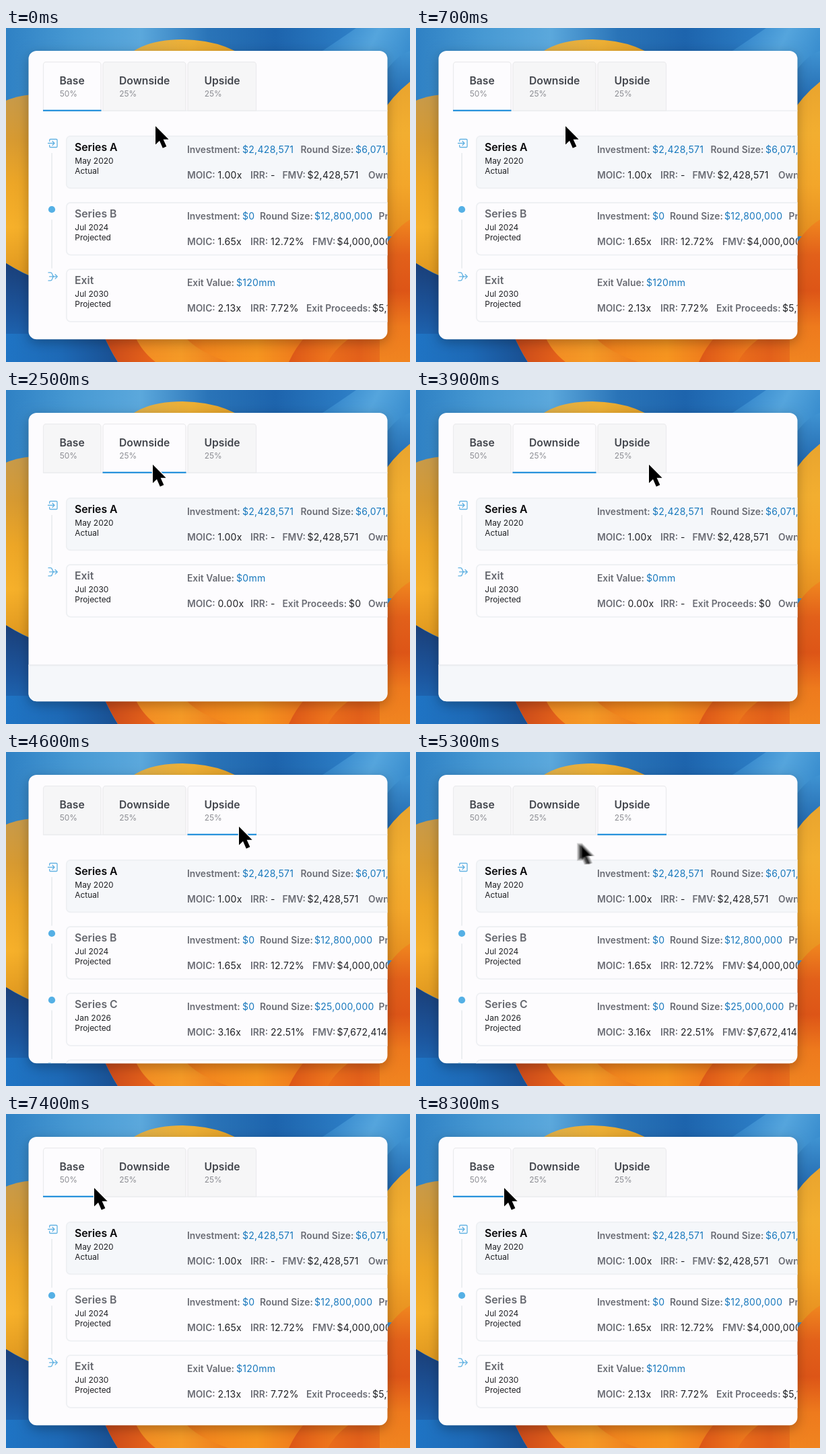
Animation, 600 px wide and 497 px high, one loop 8400 ms. Source, as an HTML page with a canvas:

```html
<!DOCTYPE html>
<html lang="en">
<head>
<meta charset="utf-8">
<title>Scenario tabs</title>
<style>
html, body { margin: 0; width: 100%; height: 100%; overflow: hidden; }
canvas { display: block; width: 600px; height: 497px; }
</style>
</head>
<body>
<canvas id="stage"></canvas>
<script>
const W = 600, H = 497, LOOP = 8400, STEP = 100, ROW = 99.2;
const FONT = 'Inter, "Liberation Sans", sans-serif';
const BLUE = '#1878bd', ICON = '#62b2e2', GREY = '#6a6c74', INK = '#1f2024', LINE = '#eceef1';

const canvas = document.getElementById('stage');
const dpr = window.devicePixelRatio || 1;
const ctx = makeLayer(canvas);
const blurCtx = makeLayer(document.createElement('canvas'));

function makeLayer(el) {
  el.width = W * dpr;
  el.height = H * dpr;
  const c = el.getContext('2d');
  c.scale(dpr, dpr);
  return c;
}

// ---- wallpaper ----
function linear(x0, y0, x1, y1, colors) {
  const g = ctx.createLinearGradient(x0, y0, x1, y1);
  colors.forEach((c, i) => g.addColorStop(i / (colors.length - 1), c));
  return g;
}

function fillPath(d, style) {
  ctx.fillStyle = style;
  ctx.fill(new Path2D(d));
}

function drawWallpaper() {
  ctx.fillStyle = linear(0, 0, W, 0, ['#2f81c4', '#4799d3', '#5ba8dc', '#2a74b8', '#1d64ad', '#2b7bc3', '#4a9ad6']);
  ctx.fillRect(0, 0, W, H);
  // light ribbon and deep blue on the right
  fillPath('M470 34 Q500 14 520 0 H600 V50 Q580 60 560 80 Z', linear(480, 0, 600, 60, ['#2f82c9', '#55a5dd', '#3388cb']));
  fillPath('M560 70 Q580 40 600 34 V130 H560 Z', linear(0, 34, 0, 110, ['#3f93d2', '#2268ae']));
  // top dome
  fillPath('M165 60 Q190 17 262 17 Q335 18 375 60 Z', linear(180, 0, 365, 0, ['#dcae4c', '#eeb035', '#dd9a25']));
  // left amber sphere
  fillPath('M0 108 Q18 100 50 98 V375 Q25 365 0 350 Z',
    linear(0, 100, 0, 362, ['#c79a4a', '#d79a31', '#eda626', '#f6b02a', '#e29a20']));
  // lower left blue
  fillPath('M0 350 Q25 366 50 375 V497 H0 Z', linear(0, 350, 0, 497, ['#1a3f78', '#1c559d', '#1f74c4']));
  fillPath('M0 455 H144 Q154 478 166 497 H0 Z', linear(0, 0, 165, 0, ['#1f74c4', '#1d69b6', '#194f91']));
  // lower petals
  fillPath('M144 455 Q154 478 166 497 H600 V455 Z',
    linear(145, 0, 600, 0, ['#c8481a', '#e8641a', '#f3861d', '#f6951f', '#ee751b', '#e3601a', '#f0801e']));
  fillPath('M190 455 Q200 480 222 497 H330 Q280 480 262 455 Z', linear(190, 0, 330, 0, ['#f28a22', '#f59a26', '#ee7c1c']));
  fillPath('M420 497 Q430 475 448 455 H520 Q490 474 478 497 Z', linear(420, 0, 520, 0, ['#dc5618', '#ec701b', '#f28520']));
  // right amber and orange
  fillPath('M555 132 Q572 102 600 80 V310 H555 Z', linear(0, 80, 0, 310, ['#e9a42e', '#f2ae30', '#f3a62a', '#e68e1f']));
  fillPath('M555 338 Q575 300 600 285 V497 H555 Z', linear(0, 285, 0, 497, ['#f0871f', '#e2601a', '#dd5517', '#ee7a1d', '#f08420']));
}

// ---- interface ----
function text(s, x, y, size, weight, color, spacing = 0) {
  ctx.font = `${weight} ${size}px ${FONT}`;
  ctx.letterSpacing = spacing + 'px';
  ctx.fillStyle = color;
  ctx.fillText(s, x, y);
}

const label = (s, x, y) => text(s, x, y, 13.8, 600, GREY);
const value = (s, x, y, color = INK) => text(s, x, y, 14, 400, color, 0.3);

function box(x, y, w, h, r, fill, stroke, lineWidth) {
  ctx.beginPath();
  ctx.roundRect(x, y, w, h, r);
  ctx.fillStyle = fill;
  ctx.fill();
  if (!stroke) return;
  ctx.strokeStyle = stroke;
  ctx.lineWidth = lineWidth;
  ctx.stroke();
}

const TABS = [
  { name: 'Base', share: '50%', x: 55, w: 86.5, tx: 79.5 },
  { name: 'Downside', share: '25%', x: 143.5, w: 124, tx: 168 },
  { name: 'Upside', share: '25%', x: 269.5, w: 102.5, tx: 294.5 }
];

function drawTabs(active) {
  ctx.fillStyle = LINE;
  ctx.fillRect(55, 122.5, 520, 1.3);
  TABS.forEach((t, i) => {
    const on = i === active;
    box(t.x + 0.5, 50.7, t.w - 1, 72.3, [4, 4, 0, 0], on ? '#fdfcfe' : '#f6f6f7', '#ebebed', 1.2);
    if (on) {
      ctx.fillStyle = '#218fdb';
      ctx.fillRect(t.x, 121.7, t.w, 2.2);
    }
    text(t.name, t.tx, 84, 15.7, 600, '#43464d');
    text(t.share, t.tx + 0.3, 102, 11.9, 400, '#8b8c92');
  });
}

function strokeIcon(d, y) {
  ctx.save();
  ctx.translate(69.5, y);
  ctx.strokeStyle = ICON;
  ctx.lineWidth = 1.3;
  ctx.lineCap = ctx.lineJoin = 'round';
  ctx.stroke(new Path2D(d));
  ctx.restore();
}

const MARKERS = {
  enter: y => strokeIcon('M-4.8 -3 V-4.8 Q-4.8 -6 -3.6 -6 H5.2 Q6.5 -6 6.5 -4.8 V4.8 Q6.5 6 5.2 6 H-3.6 Q-4.8 6 -4.8 4.8 V3 M-7 0 H2.5 M-0.5 -3 L2.5 0 L-0.5 3', y),
  exit: y => strokeIcon('M-6.5 -6 H-3.5 Q-1.5 -6 -0.8 -3.5 Q0 0 2 0 M-6.5 6 H-3.5 Q-1.5 6 -0.8 3.5 Q0 0 2 0 M-5 0 H6.7 M3.6 -3.2 L6.8 0 L3.6 3.2', y),
  dot: y => {
    ctx.fillStyle = '#55b0e5';
    ctx.beginPath();
    ctx.arc(68, y - 0.7, 5.1, 0, 7);
    ctx.fill();
  }
};

// Each cell is [x, label, offset of value, value].
const round = (name, date, size, moic, irr, fmv) => ({
  name, date, state: 'Projected', marker: 'dot',
  top: [[269, 'Investment:', 351, '$0'], [377, 'Round Size:', 458, size], [553.5, 'Pre-Money:']],
  low: [[269, 'MOIC:', 314.5, moic], [363, 'IRR:', 393, irr], [455, 'FMV:', 491.5, fmv]]
});
const exit = (worth, low) => ({
  name: 'Exit', date: 'Jul 2030', state: 'Projected', marker: 'exit',
  top: [[269, 'Exit Value:', 342, worth]], low
});

const SERIES_A = {
  name: 'Series A', date: 'May 2020', state: 'Actual', marker: 'enter', actual: true,
  top: [[269, 'Investment:', 351, '$2,428,571'], [437.5, 'Round Size:', 519, '$6,071,429']],
  low: [[269, 'MOIC:', 314.5, '1.00x'], [363, 'IRR:', 393, '-'], [410.5, 'FMV:', 447.5, '$2,428,571'], [538, 'Ownership:']]
};
const SERIES_B = round('Series B', 'Jul 2024', '$12,800,000', '1.65x', '12.72%', '$4,000,000');
const SERIES_C = round('Series C', 'Jan 2026', '$25,000,000', '3.16x', '22.51%', '$7,672,414');

const SCENARIOS = [
  [SERIES_A, SERIES_B, exit('$120mm', [
    [269, 'MOIC:', 314.5, '2.13x'], [363, 'IRR:', 393, '7.72%'], [446, 'Exit Proceeds:', 544, '$5,172,414']])],
  [SERIES_A, exit('$0mm', [
    [269, 'MOIC:', 314.5, '0.00x'], [363, 'IRR:', 393, '-'], [410.5, 'Exit Proceeds:', 509, '$0'], [538, 'Ownership:']])],
  [SERIES_A, SERIES_B, SERIES_C, exit('$400mm', [])]
];

function drawCells(cells, y, color) {
  for (const [x, name, vx, val] of cells) {
    label(name, x, y);
    if (val) value(val, vx, y, color);
  }
}

function drawCard(card, i, last) {
  const y = 160 + i * ROW;
  box(89.8, y + 0.8, 520, 77.6, 6, card.actual ? '#f5f7fa' : '#fdfcfe', '#eef0f3', 1.8);
  MARKERS[card.marker](y + 11.5);
  if (!last) {
    ctx.fillStyle = '#e9ebef';
    ctx.fillRect(67.2, y + 26, 1.7, 72.5);
  }
  text(card.name, 102, y + 23, 15.8, 600, card.actual ? '#08080a' : '#66686f');
  text(card.date, 102.3, y + 41.5, 12, 400, INK);
  text(card.state, 102.3, y + 57, 11.9, 400, INK);
  drawCells(card.top, y + 25.8, BLUE);
  drawCells(card.low, y + 64, INK);
}

function drawWindow(tab) {
  ctx.save();
  ctx.shadowColor = 'rgba(0,0,0,0.28)';
  ctx.shadowBlur = 18 * dpr;
  ctx.shadowOffsetY = 5 * dpr;
  box(33.5, 34, 533, 429.3, 12, '#fdfcfe');
  ctx.restore();

  ctx.save();
  ctx.beginPath();
  ctx.roundRect(33.5, 34, 533, 429.3, 12);
  ctx.clip();
  if (tab === 1) {
    ctx.fillStyle = '#f5f7fa';
    ctx.fillRect(33, 409, 534, 55);
    ctx.fillStyle = '#e9ebef';
    ctx.fillRect(33, 408.5, 534, 2);
  }
  drawTabs(tab);
  const cards = SCENARIOS[tab];
  cards.forEach((c, i) => drawCard(c, i, i === cards.length - 1));
  ctx.restore();
}

// ---- pointer ----
const ARROW = new Path2D('M0 0 V27.5 L6 21.8 L10.8 32.8 L16.4 30.3 L11.6 19.7 H19.6 Z');
const MOVES = [
  { start: 1000, end: 1900, from: [222, 146], to: [218, 111], bow: 0 },
  { start: 2900, end: 3700, from: [218, 111], to: [346, 111], bow: 0 },
  { start: 4910, end: 5710, from: [346, 111], to: [131, 110], bow: 24.5 }
];
const CLICKS = [[6200, 0], [4300, 2], [2100, 1], [0, 0]];

function pointerAt(t) {
  const m = MOVES.filter(v => t >= v.start).pop() || MOVES[0];
  const u = Math.min(1, Math.max(0, (t - m.start) / (m.end - m.start)));
  const p = u * u * (3 - 2 * u);
  const mix = k => m.from[k] + (m.to[k] - m.from[k]) * p;
  return [mix(0), mix(1) + m.bow * 4 * p * (1 - p)];
}

// Averages several poses over a short shutter for motion blur.
function drawPointer(t) {
  const n = 10, shutter = 18, c = blurCtx;
  c.clearRect(0, 0, W, H);
  const [ax, ay] = pointerAt(t - shutter / 2), [bx, by] = pointerAt(t + shutter / 2);
  const count = Math.hypot(bx - ax, by - ay) < 1.5 ? 1 : n;
  for (let i = 0; i < count; i++) {
    const [x, y] = pointerAt(count === 1 ? t : t + shutter * (i / (n - 1) - 0.5));
    c.save();
    c.globalCompositeOperation = 'lighter';
    c.globalAlpha = 1 / count;
    c.translate(x, y);
    c.fillStyle = '#000';
    c.fill(ARROW);
    c.globalCompositeOperation = 'destination-over';
    c.strokeStyle = '#fff';
    c.lineWidth = 2.4;
    c.lineJoin = 'round';
    c.stroke(ARROW);
    c.restore();
  }
  ctx.drawImage(c.canvas, 0, 0, W, H);
}

let shown = -1;
function frame(now) {
  const t = Math.floor((now % LOOP) / STEP) * STEP;
  if (t !== shown) {
    shown = t;
    drawWallpaper();
    drawWindow(CLICKS.find(([at]) => t >= at)[1]);
    drawPointer(t);
  }
  requestAnimationFrame(frame);
}
requestAnimationFrame(frame);
</script>
</body>
</html>
```
